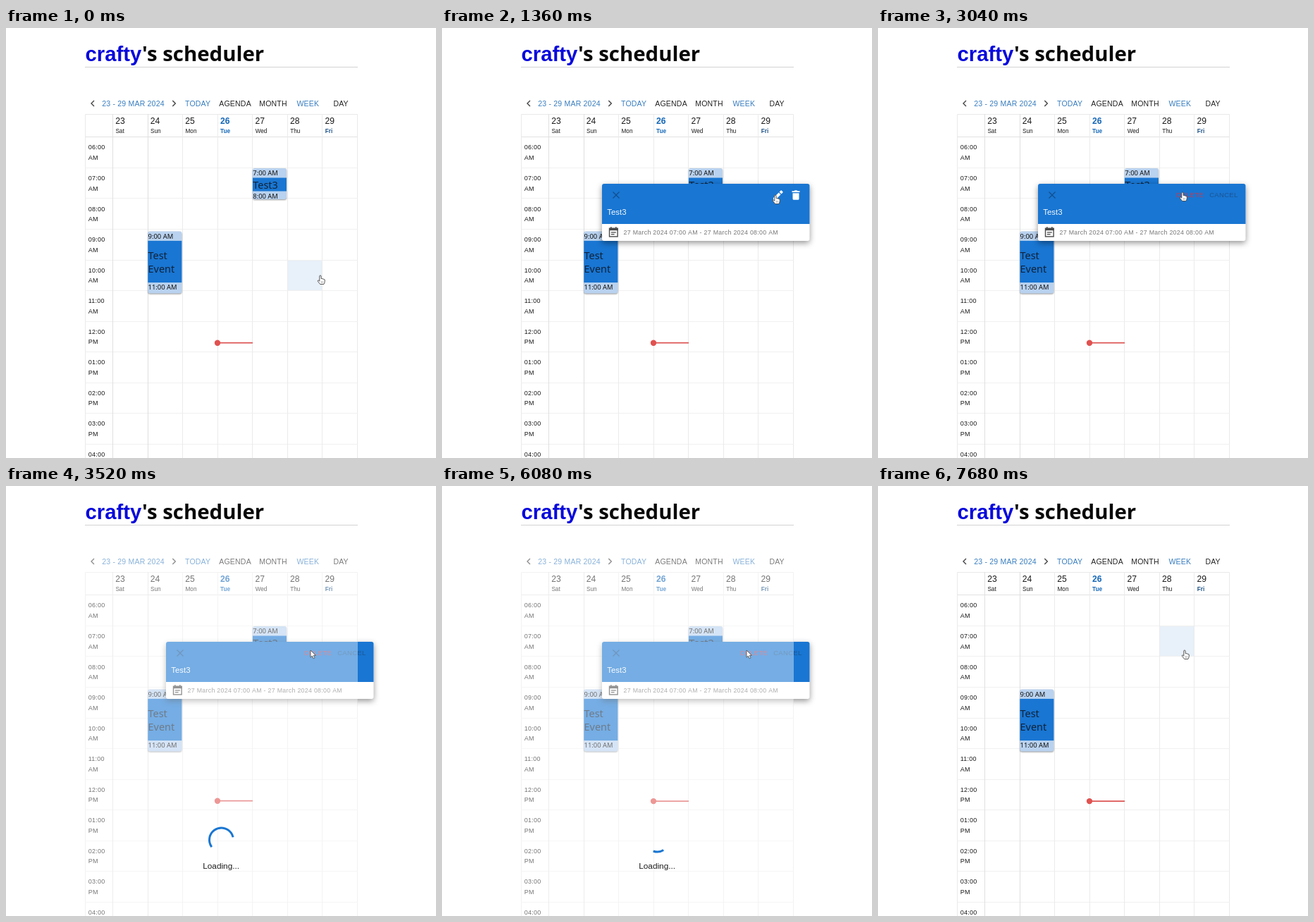
These frames come from a looping animation (610x610 px, 7.76 s). An HTML page with a canvas:

```html
<!DOCTYPE html>
<html lang="en">
<head>
<meta charset="utf-8">
<title>Scheduler</title>
<style>
html, body { margin: 0; width: 100%; height: 100%; overflow: hidden; background: #fff; }
canvas { display: block; }
</style>
</head>
<body>
<canvas id="stage" width="610" height="610"></canvas>
<script>
const ctx = document.getElementById('stage').getContext('2d');
const LOOP = 7760, POPUP_IN = 900, CONFIRM = 1760, LOAD = 3080, DONE = 6240;
const SANS = '"Liberation Sans", Arial, sans-serif';
const NOTO = '"Noto Sans", "Open Sans", sans-serif';
const BLUE = '#1976d2', LINK = '#377dbf';
const LEFT = 112.5, RIGHT = 498.5, GRID_X = 151.5, GRID_Y = 154.8, COL = 49.57, ROW = 43.55;
const DAYS = ['Sat', 'Sun', 'Mon', 'Tue', 'Wed', 'Thu', 'Fri'];

// time, x, y of the pointer tip
const TRACK = [
  [0, 446, 351], [160, 446, 351], [720, 376, 222], [960, 376, 222],
  [1360, 473, 237], [1600, 502, 236], [1840, 502, 236], [2240, 448, 302],
  [2480, 448, 302], [2880, 432, 233], [7200, 432, 233], [7600, 435, 233], [LOOP, 435, 233]
];

function text(s, x, y, size, color = '#222', { font = SANS, weight = 400, gap = 0 } = {}) {
  ctx.font = `${weight} ${size}px ${font}`;
  ctx.letterSpacing = gap + 'px';
  ctx.fillStyle = color;
  ctx.fillText(s, x, y);
}

function rect(x, y, w, h, color) {
  ctx.fillStyle = color;
  ctx.fillRect(x, y, w, h);
}

function line(points, color, width = 1) {
  ctx.beginPath();
  points.forEach(([x, y]) => ctx.lineTo(x, y));
  ctx.strokeStyle = color;
  ctx.lineWidth = width;
  ctx.stroke();
}

function shape(d, x, y, fill, stroke) {
  const path = new Path2D(d);
  ctx.save();
  ctx.translate(x, y);
  ctx.fillStyle = fill;
  ctx.fill(path);
  if (stroke) {
    ctx.strokeStyle = stroke;
    ctx.lineWidth = 0.9;
    ctx.lineJoin = 'round';
    ctx.stroke(path);
  }
  ctx.restore();
}

function shadowBox(x, y, w, h, fill, blur, drop, alpha) {
  ctx.save();
  ctx.shadowColor = `rgba(0,0,0,${alpha})`;
  ctx.shadowBlur = blur;
  ctx.shadowOffsetY = drop;
  ctx.fillStyle = fill;
  ctx.beginPath();
  ctx.roundRect(x, y, w, h, 3);
  ctx.fill();
  ctx.restore();
}

const easeInOut = x => {
  let lo = 0, hi = 1;
  for (let i = 0; i < 20; i++) {
    const u = (lo + hi) / 2, v = 1 - u;
    if (1.26 * u * v * v + 1.74 * u * u * v + u ** 3 < x) lo = u; else hi = u;
  }
  return lo * lo * (3 - 2 * lo);
};

function pointerAt(t) {
  const i = TRACK.findIndex(k => k[0] > t);
  const [t0, x0, y0] = TRACK[i - 1], [t1, x1, y1] = TRACK[i];
  const p = easeInOut((t - t0) / (t1 - t0));
  return [x0 + (x1 - x0) * p, y0 + (y1 - y0) * p];
}

function header() {
  text('crafty', 112.5, 47, 29.3, '#0808dc', { weight: 700 });
  text("'s scheduler", 193, 47, 29.4, '#080808', { font: NOTO, weight: 700 });
  rect(112, 55, 387, 1, '#d2d2d2');
  line([[125, 103], [121, 107], [125, 111]], '#444', 1.4);
  line([[236.3, 103], [240.3, 107], [236.3, 111]], '#444', 1.4);
  const button = (s, x, color) => text(s, x, 110.7, 10.5, color, { gap: 0.2 });
  button('23 - 29 MAR 2024', 136.3, LINK);
  button('TODAY', 254, LINK);
  button('AGENDA', 302.3, '#222');
  button('MONTH', 359.2, '#222');
  button('WEEK', 412.4, LINK);
  button('DAY', 464.4, '#222');
}

function grid(hover) {
  if (hover) rect(GRID_X + hover[0] * COL, GRID_Y + hover[1] * ROW, COL, ROW, '#e8f0f9');
  line([[LEFT, 610], [LEFT, 122.5], [RIGHT, 122.5], [RIGHT, 610]], '#e9e9e9');
  for (let r = 0; r < 11; r++) {
    const y = Math.floor(GRID_Y + r * ROW) + 0.5, hour = 6 + r;
    line([[LEFT, y], [RIGHT, y]], r ? '#f0f0f0' : '#e2e2e2');
    const label = String((hour - 1) % 12 + 1).padStart(2, '0') + ':00';
    text(label, 116.7, 172.4 + r * ROW, 9, '#1a1a1a', { gap: 0.25 });
    text(hour < 12 ? 'AM' : 'PM', 116.7, 187 + r * ROW, 9, '#1a1a1a', { gap: 0.25 });
  }
  DAYS.forEach((day, c) => {
    const x = Math.floor(GRID_X + c * COL) + 0.5, today = c === 3;
    line([[x, 122], [x, 610]], c < 2 ? '#dfdfdf' : '#ebebeb');
    const weight = today ? 700 : 400;
    text(23 + c, 155.2 + c * COL, 136.3, 12.1, today ? '#1668b8' : '#181818', { weight });
    text(day, 155.4 + c * COL, 149.3, 8.2, today ? '#1668b8' : c === 6 ? '#1d5288' : '#1a1a1a',
      { weight: c === 6 ? 700 : weight });
  });
}

function eventCard(x, y, h, body, start, end, words, baseline) {
  const top = y + 13.5, foot = top + body;
  shadowBox(x, y, 48, h, '#b9d2ef', 2, 1, 0.4);
  rect(x, top, 48, body, BLUE);
  text(start, x + 0.3, y + 10.3, 9.4, '#111', { font: NOTO });
  text(end, x + 0.3, foot + 10.2, 9.4, '#111', { font: NOTO });
  words.forEach((w, i) => text(w, x + 0.3, baseline + i * 19.2, 14.4, '#10233b', { font: NOTO }));
}

function nowMarker(t) {
  const y = t < 4000 ? 446.7 : 447.1;
  line([[300, y], [350, y]], '#dc5553', 1.7);
  ctx.fillStyle = '#e05250';
  ctx.beginPath();
  ctx.arc(300, y, 4.2, 0, 7);
  ctx.fill();
}

function popup(t) {
  ctx.save();
  ctx.globalAlpha = Math.min(1, (t - POPUP_IN) / 180);
  shadowBox(227, 221, 294.5, 81, '#fff', 9, 3, 0.42);
  ctx.fillStyle = BLUE;
  ctx.beginPath();
  ctx.roundRect(227, 221, 294.5, 57, [3, 3, 0, 0]);
  ctx.fill();
  line([[242.5, 232.5], [251.5, 241.5]], '#114f8f', 1.3);
  line([[251.5, 232.5], [242.5, 241.5]], '#114f8f', 1.3);
  text('Test3', 234.3, 265.2, 11.4, '#f4f8fd');
  if (t < CONFIRM) {
    shape('M0 11 V14 H3 L10.5 6.3 7.7 3.5Z M8.6 2.6 L10.6 .6 Q11.2 0 11.8 .6 L13.4 2.2 Q14 2.8 13.4 3.4 L11.4 5.4Z',
      470, 230, '#fff');
    shape('M1 4 H10 V12 Q10 13.5 8.5 13.5 H2.5 Q1 13.5 1 12Z M0 1 H3 L4 0 H7 L8 1 H11 V2.7 H0Z',
      496.5, 230.3, '#fff');
  } else {
    text('DELETE', 423.2, 240.2, 9.5, '#c33a52', { gap: 0.3 });
    text('CANCEL', 470.2, 240.2, 9.5, '#1a5695', { gap: 0.3 });
  }
  ctx.strokeStyle = '#4a4a4a';
  ctx.lineWidth = 1.4;
  ctx.strokeRect(237.5, 284.3, 11.6, 11.6);
  rect(237, 283.8, 12.6, 3.4, '#4a4a4a');
  rect(239, 282.2, 1.6, 2, '#4a4a4a');
  rect(246, 282.2, 1.6, 2, '#4a4a4a');
  rect(239.8, 289.3, 7, 1.3, '#4a4a4a');
  rect(239.8, 292, 4.8, 1.3, '#4a4a4a');
  text('27 March 2024 07:00 AM - 27 March 2024 08:00 AM', 257.5, 292.6, 8.8, '#777', { gap: 0.3 });
  ctx.restore();
}

function loader(t) {
  rect(112, 90, 387, 520, 'rgba(255,255,255,.4)');
  const p = (t - LOAD) % 1400 / 1400;
  const grow = easeInOut(Math.min(1, p * 2)), slide = easeInOut(Math.max(0, p * 2 - 1));
  // arc positions in units of a radius 20.2 ring
  const from = 15 * grow + 110 * slide;
  const to = Math.min(2 * Math.PI * 20.2, from + 1 + 99 * grow);
  const turn = p * 2 * Math.PI;
  ctx.beginPath();
  ctx.arc(305.5, 502, 17, turn + from / 20.2, turn + to / 20.2);
  ctx.strokeStyle = BLUE;
  ctx.lineWidth = 3;
  ctx.stroke();
  text('Loading...', 279.2, 543.2, 11.8, '#1c1c1c');
}

function pointer(x, y, hand) {
  if (hand) {
    shape('M-1.2 .6 Q0 -.8 1 .6 L1.2 4.6 Q2.2 4 3 5 Q4.2 4.5 4.8 5.5 Q6.3 5.2 6.3 7 ' +
      'L6 10 4.9 12.5 H-.3 L-3.6 8.4 Q-4.2 7 -2.8 6.9 L-1.2 8.2Z', x, y, '#fff', '#444');
    line([[x + 1.3, y + 8], [x + 1.3, y + 11]], '#777', 0.6);
    line([[x + 3.2, y + 8], [x + 3.2, y + 11]], '#777', 0.6);
  } else {
    shape('M0 0 V10.2 L2.4 8 4.1 11.8 6 11 4.3 7.3 H7.4Z', x, y, '#fff', '#555');
  }
}

function draw(t) {
  const open = t >= POPUP_IN && t < DONE, loading = t >= LOAD && t < DONE;
  const [x, y] = pointerAt(t);
  const cell = [Math.floor((x - GRID_X) / COL), Math.floor((y - GRID_Y) / ROW)];
  const onEvent = cell[0] === 4 && cell[1] === 1;
  rect(0, 0, 610, 610, '#fff');
  header();
  grid(!open && !onEvent && cell);
  if (t < DONE) eventCard(350, 199, 44, 19, '7:00 AM', '8:00 AM', ['Test3'], 227.5);
  eventCard(201.3, 288.4, 88, 59.2, '9:00 AM', '11:00 AM', ['Test', 'Event'], 328);
  nowMarker(t);
  if (open) popup(t);
  if (loading) loader(t);
  pointer(x, y, !open || (!loading && x > 420 && y < 245));
}

const begin = performance.now();
function tick() {
  draw((performance.now() - begin) % LOOP);
  requestAnimationFrame(tick);
}
tick();
</script>
</body>
</html>
```
